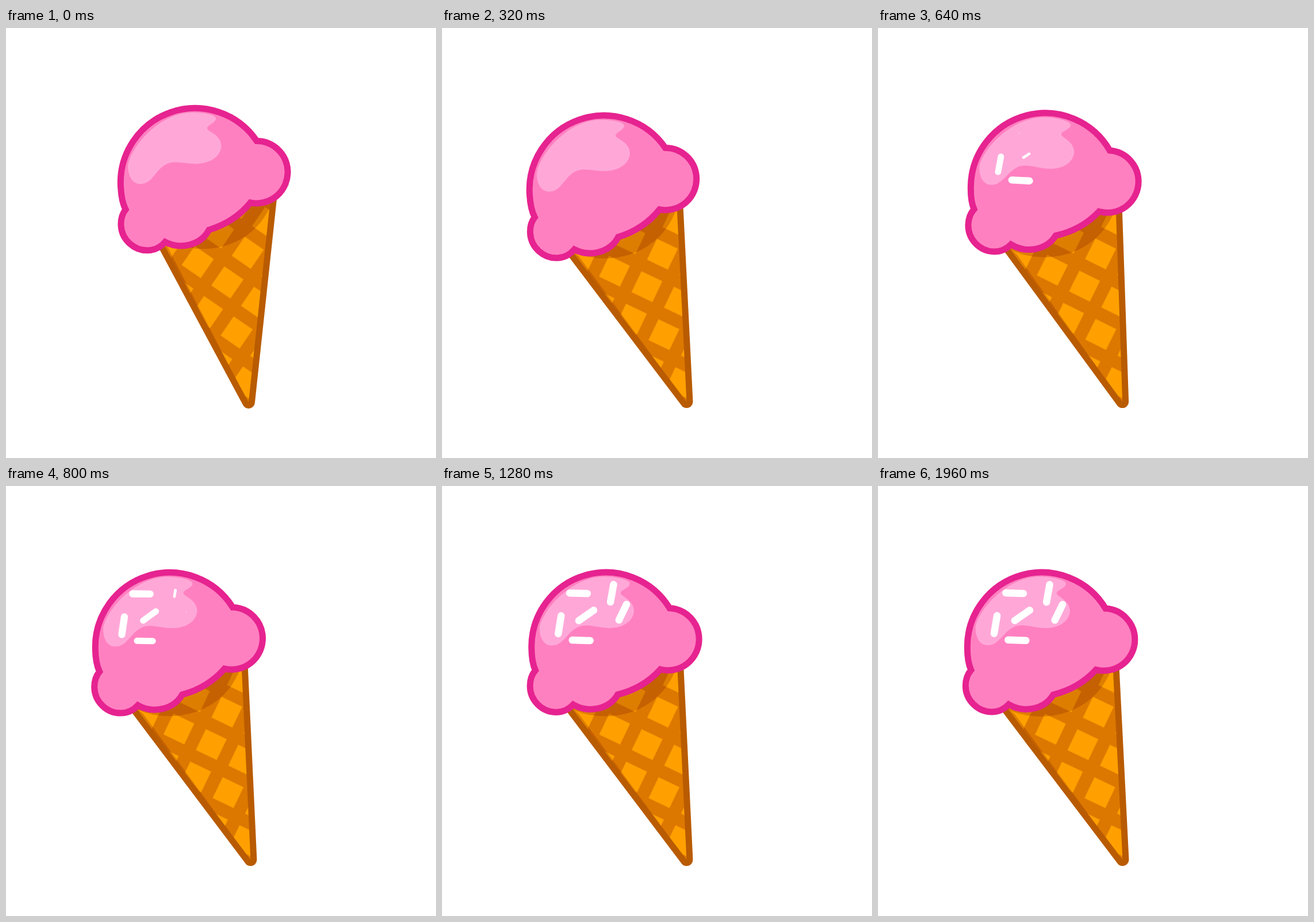
Write an HTML page that moves like this. It is 748x748 px and loops after 2000 ms.

```html
<!DOCTYPE html>
<html lang="en">
<head>
<meta charset="utf-8">
<title>Ice cream cone</title>
<style>
  html, body { margin: 0; width: 100%; height: 100%; overflow: hidden; background: #fff; }
  svg { display: block; width: 100vw; height: 100vh; }
</style>
</head>
<body>
<svg viewBox="0 0 748 748">
  <defs>
    <pattern id="waffle" width="62.6" height="62.6" patternUnits="userSpaceOnUse"
             patternTransform="translate(356.5 450) rotate(25.5) translate(-31.3 -31.3)">
      <rect width="62.6" height="62.6" fill="#dc7800"/>
      <rect x="11.2" y="11.2" width="40.2" height="40.2" fill="#ffa000"/>
    </pattern>
    <path id="wedge" d="M212 368.6 L407.5 290 L425.5 650Z"/>
    <clipPath id="inside"><use href="#wedge"/></clipPath>
  </defs>

  <g id="cone">
    <use href="#wedge" fill="#b95b00" stroke="#b95b00" stroke-width="22" stroke-linejoin="round"/>
    <use href="#wedge" fill="url(#waffle)"/>
    <g clip-path="url(#inside)" fill="#892700" fill-opacity=".28">
      <path d="M210 380 C270 420 380 405 409 310 L400 280 L210 340Z"/>
      <path d="M226 387 L238 397 L395 610Z"/>
    </g>

    <g id="scoop">
      <path id="ball" fill="#ff80c0" d="M162 320 C157 309 155.5 296 155.5 281
        A129.5 129.5 0 0 1 396 213 A54 54 0 0 1 447 267 A54 54 0 0 1 379.5 319.5
        Q350 352 305 363 C290 388 255 396 227.5 380
        C219 389 209 393 198 393 C173 393 152.5 372 152.5 347.5 C152.5 337 155 328 162 320Z"/>
      <path fill="#ffa8d8" d="M282 157.5 C306 158 327 164 327 170 C327 178 310 181 311 187
        C312 193 334 198 334 218 C333 233 318 248 289 247 C265 246 249 237 233 247
        C216 257 210 277 191 277 C176 277 169 262 170 244 C178 209 230 157 282 157.5Z"/>
      <use href="#ball" style="fill-opacity:0" stroke="#e62390" stroke-width="11"/>
      <g id="sprinkles" stroke="#fff" stroke-width="12.5" stroke-linecap="round"></g>
    </g>
  </g>
</svg>

<script>
  const LOOP = 2000, STEP = 40;
  const cone = document.getElementById('cone');
  const scoop = document.getElementById('scoop');
  const layer = document.getElementById('sprinkles');

  // centre x, centre y, half extent x, half extent y
  const sprinkles = [
    [204.7, 241, -2.6, 15.5],
    [242, 268.3, 15.5, 0.5],
    [251, 225, 13, -9],
    [237.7, 186.4, 15.3, 0.5],
    [296, 186.7, -2.8, 15.3],
    [314.5, 219.7, -6.7, 13.7]
  ].map(([x, y, dx, dy]) => {
    const line = document.createElementNS('http://www.w3.org/2000/svg', 'line');
    const ends = { x1: -dx, y1: -dy, x2: dx, y2: dy };
    for (const key in ends) line.setAttribute(key, ends[key]);
    layer.append(line);
    return { line, x, y };
  });

  // Linear move to zero, then a decaying swing driven by the arrival speed.
  function swing(t, from, start, end) {
    if (t <= start) return from;
    if (t <= end) return from * (end - t) / (end - start);
    const s = (t - end) / 1000;
    const speed = from * 1000 / (end - start);
    return -speed * 0.1 * Math.sin(4 * Math.PI * s) * Math.exp(-2.7 * s);
  }

  const dip = (age, mid, half, depth) => 1 - depth * (1 - ((age - mid) / half) ** 2);

  // Accelerating growth that bounces off full size.
  function pop(age) {
    if (age <= 0) return 0;
    if (age < 206) return (age / 206) ** 2;
    if (age < 426) return dip(age, 316, 110, 0.15);
    if (age < 526) return dip(age, 476, 50, 0.025);
    return 1;
  }

  function draw(t) {
    cone.setAttribute('transform', `rotate(${swing(t, 9, 0, 320)} 418 628)`);
    scoop.setAttribute('transform', `rotate(${swing(t, -12, 120, 400)} 316 337)`);
    sprinkles.forEach(({ line, x, y }, i) => {
      const size = pop(t - 355 - 80 * i);
      line.setAttribute('transform', `translate(${x} ${y}) scale(${size})`);
      line.setAttribute('visibility', size ? 'visible' : 'hidden');
    });
  }

  const begin = performance.now();
  function tick() {
    const t = (performance.now() - begin) % LOOP;
    draw(Math.floor(t / STEP) * STEP);
    requestAnimationFrame(tick);
  }
  tick();
</script>
</body>
</html>
```
